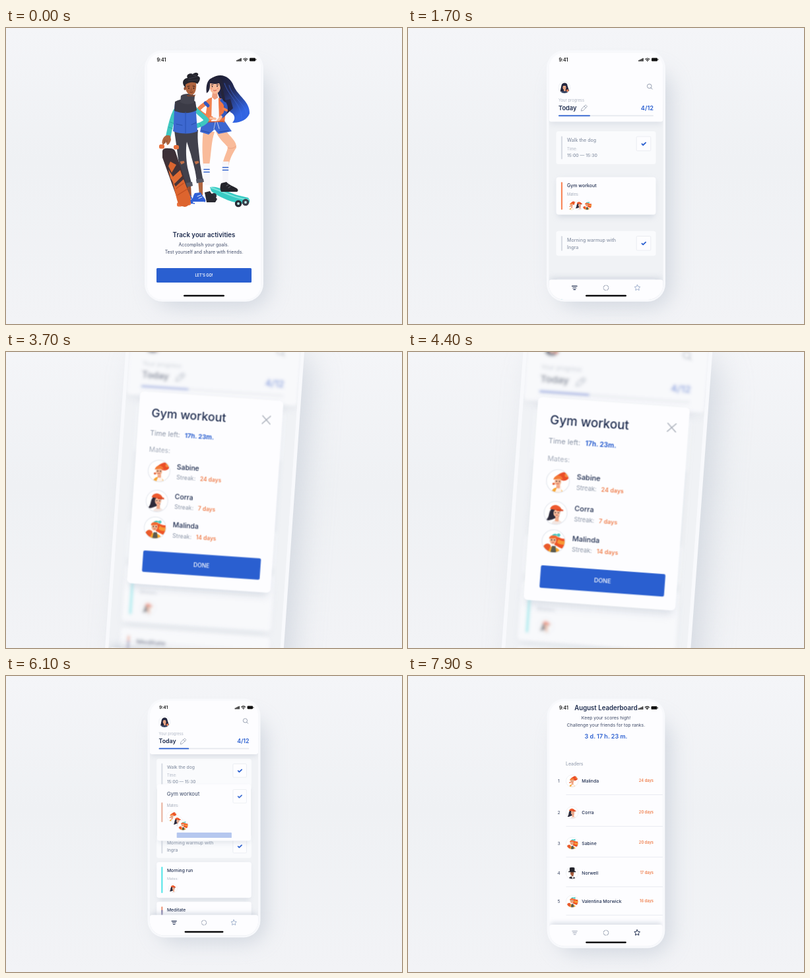
These frames come from a looping animation (600 px wide and 450 px high, 8000 ms). An HTML page:

```html
<!DOCTYPE html>
<html lang="en">
<head>
<meta charset="utf-8">
<title>Activity tracker</title>
<style>
html, body { margin: 0; width: 100%; height: 100%; overflow: hidden; background: #f0f2f6; }
svg { display: block; width: 100vw; height: 100vh; }
text { font-family: Inter, "Open Sans", sans-serif; }
</style>
</head>
<body>
<svg id="stage" viewBox="0 0 600 450"></svg>
<script>
const NAVY = '#1f2d4f', BLUE = '#2a5fd0', ORANGE = '#f0804f', GRAY = '#8b95a7', PALE = '#b1b8c5', LINE = '#e3e7ee';
const LOOP = 8000;

// Text is placed by its left, middle or right edge and its optical centre line.
const text = (x, y, str, size, fill = NAVY, weight = 400, anchor = 'start') =>
  `<text x="${x}" y="${(y + size * 0.36).toFixed(2)}" font-size="${size}" fill="${fill}" font-weight="${weight}" text-anchor="${anchor}">${str}</text>`;
const rect = (x, y, w, h, r, fill, extra = '') =>
  `<rect x="${x}" y="${y}" width="${w}" height="${h}" rx="${r}" fill="${fill}" ${extra}/>`;
const path = (d, fill, extra = '') => `<path d="${d}" fill="${fill}" ${extra}/>`;
const stroke = (d, color, width, extra = '') =>
  `<path d="${d}" fill="none" stroke="${color}" stroke-width="${width}" stroke-linecap="round" stroke-linejoin="round" ${extra}/>`;
const circle = (x, y, r, fill, extra = '') => `<circle cx="${x}" cy="${y}" r="${r}" fill="${fill}" ${extra}/>`;
const ellipse = (x, y, rx, ry, fill) => `<ellipse cx="${x}" cy="${y}" rx="${rx}" ry="${ry}" fill="${fill}"/>`;
const group = (id, body, extra = '') => `<g id="${id}" ${extra}>${body}</g>`;
const at = (x, y, body, s = 1) => `<g transform="translate(${x} ${y}) scale(${s})">${body}</g>`;

const face = (skin, x = 0, y = 0) => ellipse(x, y, 2.8, 3.4, skin) +
  circle(x - 1.2, y - .3, .5, '#2b2530') + circle(x + 1.3, y - .3, .5, '#2b2530') +
  stroke(`M${x - .8} ${y + 1.7}q.9 .7 1.8 0`, '#c2433a', .5);

// Portraits drawn in a disc of radius 10.
const portraits = {
  pom: path('M-5 10C-4 4 4 4 5 10Z', '#f6a532') + path('M-2 10l2-6 3 0 1 6Z', '#fff4ec') +
    path('M-1 2h3v4h-3Z', '#f3a583') + path('M-2-4C2-8 7-10 9-6C10-2 6 0 3-1Z', '#ea4d27') + face('#f8b893', 0, .5) +
    path('M-4-1C-3-6 3-6 4-2L0-2Z', '#f47a35') + circle(7, -5.5, 1.6, '#f58a3c') + circle(-3.5, 2.5, 1, '#e4582b'),
  cap: path('M-3-4C-7 0-4 3-8 7C-4 7-1 5 3 3L4-3Z', '#2c2a3a') + path('M-3 10C-2 5 5 4 7 10Z', '#f2e6e2') +
    path('M0 3h3v4h-3Z', '#f1a988') + face('#f9bf9f', 1) + path('M-5-3C-4-8 3-8 5-3L1-2.4Z', '#ee5a2e') + path('M0-3L6-3.4 6.5-2 1-1.8Z', '#d9441f'),
  wind: path('M0-4C4-5 6-2 10-3L10 6C6 6 4 4 1 3Z', '#ef5326') + path('M4-2q3 2 6 1v3q-4 1-7-1Z', '#f79a35') +
    path('M-9 10C-7 3 5 3 7 10Z', '#f4a62c') + path('M-9 7C-8 2-4 1-2 4L-4 9Z', '#ea5a2a') +
    path('M-2 10l1-6 3 0 1 6Z', '#5a5a4f') + face('#f7b48d', -.5, -.8) +
    path('M-4-2C-4-6 3-6 3.5-3Z', '#f1672f') + path('M-2-5q3-3 6 0Z', '#48c5bd') + circle(4, -5.5, 1.4, '#48c5bd'),
  user: path('M-5-3C-4-9 5-9 5-3L8 6-7 7Z', '#22243b') + path('M-7 10C-5 4 5 4 8 10Z', '#33405f') +
    path('M-1 2h3v4h-3Z', '#f1a988') + face('#f6b591') + path('M-4-2C-2-7 4-6 4-2L0-3Z', '#2b2d47') + circle(5, 5, 2, '#e57a52'),
  hat: path('M-6 10C-5 4 4 4 6 10Z', '#33333d') + path('M-1 2h3v4h-3Z', '#8d4b2f') + face('#a85f3c', 0, .3) +
    rect(-4, -9, 8, 7, 1, '#24242c') + rect(-6, -3, 12, 1.5, .7, '#24242c') + path('M-1 5l2 5 2-5Z', '#f0efee')
};
const avatar = kind => circle(0, 0, 10, '#fff') + `<g clip-path="url(#disc)">${portraits[kind]}</g>` +
  circle(0, 0, 9.8, 'none', `stroke="${LINE}" stroke-width=".6"`);

const shadow = (x, y, w, h, r, opacity = .45) => rect(x, y, w, h, r, '#c2c9d5', `opacity="${opacity}" filter="url(#soft)"`);
const checkbox = rect(-10.8, -10.8, 21.6, 21.6, 1.5, '#fdfdff', 'stroke="#dfe3ea" stroke-width=".6"') +
  stroke('M-2.6 .3l1.8 1.8 3.9-3.7', BLUE, 1.8);

function boy() {
  const pants = '#41414c', brown = '#b0653f', teal = '#3fc7c0';
  const rip = (x, y) => path(`M${x - 3.5} ${y - 2}l6-1 1 3-5 2.5Z`, '#c07048');
  const wheel = (x, y) => rect(x - 4, y - 3, 8, 6.5, 2.5, '#e8703c');
  const shoe = (x, y) => path(`M${x} ${y}l9-1c2 5 5 7 7 11q1 3-1 4H${x - 3}q-1-8 3-14Z`, '#2f5fd6') +
    stroke(`M${x - 2} ${y + 14}h16`, '#eef1fb', 1.8) + stroke(`M${x + 4} ${y + 5}l5-2m-3 5l5-2`, '#fff', .9);
  return path('M273 238h7l1 19h-6Z', '#994f31') + path('M291 232h7l0 22h-5Z', brown) +
    shoe(270, 254) + shoe(286, 251) +
    path('M255 156L291 155C289 170 293 190 294 206L299 234L289 235C288 218 283 205 280 192L274 173C272 184 273 200 275 212L282 240L272 242C268 226 263 212 261 200C259 184 257 170 255 156Z', pants) +
    rip(267, 205) + rip(289, 205) + path('M271 236l11-2 1 6-11 2Z', '#555561') + path('M288 230l11-1 1 5-11 2Z', '#555561') +
    stroke('M257 126C252 136 249 148 246 164', teal, 7.5) + stroke('M249 143l5 2m-7 6l5 2', '#2ba9a6', 1) +
    stroke('M286 123C293 130 300 135 304 140C300 146 292 148 284 150', teal, 7) + stroke('M293 145l2 4', '#2ba9a6', 1) +
    path('M256 114C266 108 282 108 287 114L290 157C281 162 263 161 253 157C255 143 254 127 256 114Z', '#3d68d0') +
    path('M256 112C267 106 281 106 287 112L289 125C278 131 266 130 255 126Z', '#3b3b46') +
    stroke('M272 128L272 160', '#2850b2', 1) + stroke('M258 146l9 2m14-1l7-3', '#274fa9', 1) +
    path('M265 103C269 99 282 99 286 103L285 113C280 117 270 116 264 113Z', '#44444f') +
    path('M271 83C273 78 286 77 288 83C289 92 287 101 281 102C274 101 271 94 271 83Z', brown) +
    path('M274 101c4 2 9 2 13 0l-1 3h-11Z', '#7c432c') + ellipse(271, 92, 1.6, 2.5, '#8e4e32') +
    path('M269 87C266 80 271 76 275 76C272 71 279 68 283 70C288 66 294 69 290 73C297 74 293 82 290 85C285 81 277 82 272 86L272 91Z', '#25252d') +
    stroke('M277 77l12-3m-13 6l15-1m-10-9l7 3', '#3c3c47', 1) +
    stroke('M275 89l3-.8m5 0l3 .6', '#3b211a', 1) + circle(277, 91.5, .9, '#2a1814') + circle(284.5, 91.5, .9, '#2a1814') +
    stroke('M280.5 92l.6 3-1.4 0', '#7d432b', .7) + stroke('M279 97.5q2.4 1 4-.3', '#67301f', .9) +
    wheel(236, 180) + wheel(258, 181) + wheel(263, 268) + wheel(276, 266) +
    path('M237 187Q238 182 247 183Q255 182 257 189L279 255Q281 270 271 272Q262 271 260 261L237 197Z', 'url(#deck)') +
    path('M249 203l9 5-7 12-5-10Z', '#da652f') + path('M246 215l7 11 11-10 3 9-12 12-6-9Z', '#e16c33') +
    path('M252 232l5 9 12-11 11 28q0 12-9 13-10 0-12-10Z', '#dd642e') + stroke('M258 244l11-8m-9 18l16-10', '#c24f20', 1.4) +
    path('M238 168q4-7 11-4l1 6q-2 7-6 8l-1-5-5 5q-3-4 0-10Z', brown) + stroke('M241 170l-1 5m4-4l-1 4', '#78402a', .8);
}

function girl() {
  const skin = '#f9bb9a', shade = '#ee9f7f', coat = '#f0814f';
  const shoe = (x, y) => path(`M${x} ${y}l8-2c4 5 10 6 16 10q3 3 0 5h-24q-3-6 0-13Z`, '#24242b') +
    stroke(`M${x + 8} ${y + 4}l3-2m0 5l3-2`, '#787985', .8);
  const sock = (x, y, lean) => path(`M${x} ${y}h10l${lean - 1} 33h-8Z`, '#f7f6fa') +
    stroke(`M${x + 1} ${y + 9}h8m-8 4h8`, '#3767ce', 1.7);
  return path('M312 76C326 67 340 74 345 88C351 103 370 112 369 130C366 139 354 145 343 144C349 137 346 131 340 128C336 120 330 114 324 108Z', 'url(#hair)') +
    stroke('M331 84C337 104 358 117 357 138M338 87C343 107 366 118 364 132', '#4170e6', 1, 'opacity=".6"') +
    path('M299 156L316 158C311 172 311 190 308 209L299 209C297 192 297 171 299 156Z', skin) +
    path('M318 157L333 156C339 165 350 172 349 182C343 191 339 199 337 210L328 210C329 197 336 187 336 181C330 174 322 168 318 157Z', skin) +
    stroke('M336 182C340 184 345 183 348 180', shade, 1) + sock(299, 206, 1) + sock(327.5, 203, 0) +
    path('M309 242C319 239 335 249 350 254L367 258Q372 264 366 268C346 267 325 259 311 248Z', '#39cbc4') +
    stroke('M311 243C325 246 343 259 367 261', '#7ce4dc', 2) +
    circle(315, 255, 4, '#30313c') + circle(352, 267, 5.2, '#282a35') + circle(363, 265, 5.2, '#3a3d49') +
    circle(352, 267, 1.9, '#b9eee9') + circle(363, 265, 1.9, '#b9eee9') +
    path('M301 250l8-2c2 5 8 8 11 12l-3 5h-13Z', '#2a2a32') + shoe(326, 236) +
    path('M297 142L331 141L342 157L322 161L316 154L307 162L294 158Z', '#3d67d1') + stroke('M316 143v11m-20 2l12 3m15-1l14-2', '#2348a5', 1) +
    path('M306 108Q316 102 327 108L331 143H301Z', coat) + path('M312 106h10l1 37h-12Z', '#faf8fb') +
    path('M322 107l5 0 6 18-2 19-7-3Z', '#ee7544') + path('M330 110l10-2 4 14-13 12Z', '#25274a') + stroke('M327 110C335 116 336 128 328 134', '#3158bf', 5) +
    stroke('M330 123l4 2', '#f0814f', 4) + stroke('M308 111C300 116 294 120 291 125C297 131 304 135 311 137', coat, 6) +
    stroke('M302 114l4 4', '#3158bf', 5) + stroke('M310 137l7 1', skin, 3.6) + stroke('M326 135l-5 6', skin, 3.6) +
    stroke('M301 143l29-1', '#c9532e', 1.4) + stroke('M317 143l-2 11m5-11l3 10', '#e8edfa', .8) +
    path('M313 97h7l1 9-5 3-4-4Z', shade) + path('M308 82C311 75 324 76 325 85C326 93 323 100 316 100C310 99 307 91 308 82Z', skin) +
    path('M304 99C302 83 308 74 318 75C326 74 331 83 329 94L333 113C324 110 327 93 323 84C316 86 311 84 309 84C309 90 309 96 304 99Z', '#24243a') +
    circle(312.5, 89, .9, '#271b26') + circle(320, 88.5, .9, '#271b26') + stroke('M311 86.6l3-.6m5 0l3 .4', '#35202a', .9) +
    stroke('M314.5 95q2 1.2 4.2-.4', '#d0443e', 1) + circle(311.5, 92, 1.2, '#f49b82') + circle(321, 92, 1.2, '#f49b82');
}

function cards() {
  const row = (y, h, color, active) => (active ? shadow(227, y + 4, 146, h, 4) : '') +
    rect(224.5, y, 151, h, 3.5, active ? '#fdfdff' : '#fafbfd') + rect(231.9, y + 7.5, 2.2, h - 15, 1, color);
  const title = (y, str, active) => text(241, y, str, 7.1, active ? NAVY : GRAY, 500);
  const mates = (y, kind) => text(241, y + 26, 'Mates:', 5.7, PALE) + at(250.5, y + 42, avatar(kind), .72);
  return group('card0', row(130, 50, '#d9dde4') + title(143.5, 'Walk the dog') + text(241, 156.8, 'Time:', 5.8, PALE) +
      text(241, 166.5, '15:00 — 15:30', 6.8, GRAY, 500) + at(357, 149, checkbox)) +
    group('card2', row(251.5, 37.5, '#d9dde4') + title(264.8, 'Morning warmup with') + title(276, 'Ingra') + at(357, 270, checkbox)) +
    group('card3', row(295.5, 57, '#54e4e8', true) + title(308.3, 'Morning run', true) + mates(295.5, 'cap')) +
    group('card4', row(359, 57, '#ed9275', true) + rect(231.9, 372, 2.2, 36, 1, '#7d86b8') + title(372, 'Meditate', true) + mates(359, 'hat'));
}

const header = rect(213.5, -345, 173, 468, 4, '#fdfdff') + group('headBody',
  at(237, 71, avatar('user'), .92) +
  circle(365.7, 69, 3.3, 'none', 'stroke="#8b95a7" stroke-width=".9"') + stroke('M368.2 71.6l2 2', GRAY, 1) +
  text(228, 90.3, 'Your progress', 5.9, PALE) + text(228, 102, 'Today', 9.3, NAVY, 600) +
  stroke('M262.5 106.3l.7-3 5.2-5.2q.8-.7 1.6 0l.9.9q.7.8 0 1.6l-5.2 5.1Zm4.4-6.8l2.6 2.6', GRAY, .8) +
  text(372, 102, '4/12', 9.2, BLUE, 600, 'end') +
  rect(228, 113, 144, 1.8, .9, '#e5e8ee') + rect(228, 113, 48, 1.8, .9, BLUE));

function gymCard() {
  const mate = (name, days, y) => text(269.7, y - 5, name, 6.9, NAVY, 500) +
    text(270, y + 5.5, 'Streak:', 5.8, GRAY) + text(293.8, y + 5.5, `${days} days`, 5.6, ORANGE, 600);
  return `<rect id="gymShade" rx="4" fill="#bcc4d2" filter="url(#soft)"/><rect id="gymBox" rx="4" fill="#fdfdff"/>` +
    `<rect id="gymBar" x="231.9" width="2.2" rx="1"/>` +
    group('gymTitle', text(0, 0, 'Gym workout', 7, 'currentColor', 500)) +
    group('gymMates', text(0, 0, 'Mates:', 5.7, '#a4acba')) +
    group('info', text(240.3, 160.3, 'Time left:', 6.9, GRAY) + text(275.5, 160.5, '17h. 23m.', 6.3, BLUE, 700) +
      mate('Sabine', 24, 198) + mate('Corra', 7, 228) + mate('Malinda', 14, 257)) +
    ['pom', 'cap', 'wind'].map((kind, i) => group('mate' + i, avatar(kind))).join('') +
    group('done', rect(-59.5, -10.8, 119, 21.6, 1.5, BLUE) + group('doneText', text(0, 0, 'DONE', 5.7, '#fff', 500, 'middle'))) +
    group('close', stroke('M-4-4L4 4M4-4L-4 4', '#a7adb8', .9)) + group('gymCheck', checkbox);
}

const leaders = [['Malinda', 24, 'pom', 160], ['Corra', 20, 'cap', 208.5], ['Sabine', 20, 'wind', 255.5],
  ['Norwell', 17, 'hat', 301], ['Valentina Morwick', 16, 'wind', 344.5]];
const leaderboard = rect(213, 36, 174, 378, 0, '#fdfdff') + group('boardHead',
    text(300, 48.5, 'August Leaderboard', 9.7, NAVY, 600, 'middle') +
    text(300, 63.5, 'Keep your scores high!', 6.9, '#3f4a66', 400, 'middle') +
    text(300, 74.5, 'Challenge your friends for top ranks.', 6.9, '#3f4a66', 400, 'middle') +
    text(300, 91.8, '3 d. 17 h. 23 m.', 9.1, BLUE, 600, 'middle') + text(238.6, 134, 'Leaders', 7, GRAY)) +
  leaders.map(([name, days, kind, y], i) => group('leader' + i,
    text(228, y, i + 1, 6.9, '#3f4a66', 400, 'middle') + at(248.3, y, avatar(kind), .95) + text(263, y, name, 6.9, NAVY, 500) +
    text(372.5, y - 1, `${days} days`, 5.8, ORANGE, 600, 'end') + rect(239, y + 20.5, 148, 1, 0, '#e9ebf1'))).join('');

const star = Array.from({ length: 10 }, (_, i) => {
  const a = i * Math.PI / 5, r = i % 2 ? 2.3 : 4.6;
  return `${(Math.sin(a) * r).toFixed(2)} ${(-Math.cos(a) * r).toFixed(2)}`;
}).join('L');
const nav = shadow(215, 377, 170, 40, 4, .6) + rect(213.5, 380, 173, 50, 4, '#fdfdff') +
  group('navList', stroke('M248.5 389.8h7.6m-6.4 2.6h5.2m-4 2.6h2.8', 'currentColor', 1.2)) +
  circle(300, 392.4, 3.9, 'none', `stroke="${GRAY}" stroke-width=".9" stroke-dasharray="5.2 .9"`) +
  group('navStar', stroke(`M${star}Z`, 'currentColor', 1), 'transform="translate(347.5 392.4)"');

const statusBar = text(228.4, 48, '9:41', 7, '#111', 600) +
  [0, 1, 2, 3].map(i => rect(349.2 + i * 2, 48.7 - i, 1.5, 2 + i, .4, '#111')).join('') +
  stroke('M359.7 47.3q3.1-2.7 6.2 0m-4.7 1.5q1.6-1.3 3.2 0', '#111', 1.1) + circle(362.8, 50.2, .8, '#111') +
  rect(369, 45.6, 9, 4.8, 1.2, '#111') + rect(378.5, 47, .9, 2, .4, '#111') + rect(269, 405.8, 62, 2.5, 1.2, '#0a0a0c');

document.getElementById('stage').innerHTML = `
<defs>
  <linearGradient id="back" x2="0" y2="1"><stop stop-color="#f4f5f8"/><stop offset=".45" stop-color="#eff1f4"/><stop offset="1" stop-color="#f2f3f6"/></linearGradient>
  <linearGradient id="hair" x1=".1" y1="0" x2=".8" y2="1"><stop stop-color="#1d1d2e"/><stop offset=".4" stop-color="#232a57"/><stop offset=".85" stop-color="#3164e2"/></linearGradient>
  <linearGradient id="deck" x2="0" y2="1"><stop stop-color="#3a3038"/><stop offset=".65" stop-color="#493437"/><stop offset="1" stop-color="#d9622c"/></linearGradient>
  <clipPath id="disc"><circle r="9.6"/></clipPath>
  <clipPath id="screen"><rect x="213.5" y="37.5" width="173" height="375.5" rx="23"/></clipPath>
  <filter id="soft" x="-30%" y="-60%" width="160%" height="220%"><feGaussianBlur stdDeviation="4"/></filter>
  <filter id="wide" x="-60%" y="-30%" width="220%" height="160%"><feGaussianBlur stdDeviation="16"/></filter>
  <filter id="blur" x="-10%" y="-10%" width="120%" height="120%"><feGaussianBlur id="blurSize" stdDeviation="1"/></filter>
</defs>
${rect(0, 0, 600, 450, 0, 'url(#back)')}
${group('phone', rect(226, 66, 172, 358, 30, '#bcc4d0', 'opacity=".6" filter="url(#wide)"') + rect(210, 34, 180, 382, 27, '#f8f9fc') +
  `<g clip-path="url(#screen)">${rect(213, 37, 174, 377, 0, '#f0f2f5') +
    group('list', cards() + group('head', shadow(215, 90, 170, 36, 4) + header)) + group('gym', gymCard()) +
    group('intro', group('people', girl() + boy()) + group('pitch',
      text(300, 315, 'Track your activities', 9.7, NAVY, 600, 'middle') +
      text(299.5, 330, 'Accomplish your goals.', 6.9, '#3f4a66', 400, 'middle') +
      text(300, 341, 'Test yourself and share with friends.', 6.9, '#3f4a66', 400, 'middle')) +
      group('start', rect(228, 365, 144, 22, 1.5, BLUE) + text(300, 376, 'LET’S GO!', 5.6, '#fff', 600, 'middle'))) +
    group('board', leaderboard) + group('nav', nav) + statusBar}</g>`)}
<circle id="touch" fill="#59678c" fill-opacity=".23" stroke="#4f5c86"/>`;

const nodes = {};
document.querySelectorAll('[id]').forEach(n => nodes[n.id] = n);
function set(id, attrs) {
  for (const key in attrs) nodes[id].setAttribute(key, attrs[key]);
}
const move = (id, x, y, sx = 1, sy = sx) => set(id, { transform: `translate(${x} ${y}) scale(${sx} ${sy})` });
const show = (id, opacity) => set(id, { opacity, display: opacity > .001 ? 'inline' : 'none' });

const lerp = (a, b, p) => a + (b - a) * p;
const ramp = (t, from, to) => Math.min(1, Math.max(0, (t - from) / (to - from)));
const smooth = p => p * p * (3 - 2 * p);
const cubic = p => p < .5 ? 4 * p ** 3 : 1 - 4 * (1 - p) ** 3;
const settle = (t, mark, size) => size * Math.exp(-(t - mark) / 280);
const mix = (a, b, p) => `rgb(${a.map((v, i) => Math.round(lerp(v, b[i], p)))})`;

// time, scale, angle, centre x, centre y
const camera = [
  [0, 1, 0, 300, 225], [1850, 1, 0, 300, 225], [2800, 2.05, 4.4, 299.5, 224.5], [3050, 2.07, 4.4, 299.5, 224.5],
  [3650, 1.5, 3.95, 301, 225.5], [4600, 1.6, 4.2, 300, 246.5], [5450, 1.6, 4.2, 300, 246.5],
  [6050, .95, 0, 300, 216], [6150, .95, 0, 300, 216], [6700, .985, 0, 300, 222.5], [8000, .993, 0, 300, 224.2]];

function moveCamera(t) {
  const i = camera.findIndex(key => key[0] > t), a = camera[i - 1], b = camera[i];
  const p = smooth(ramp(t, a[0], b[0]));
  const [s, angle, x, y] = [1, 2, 3, 4].map(k => lerp(a[k], b[k], p));
  set('phone', { transform: `translate(${x} ${y}) rotate(${angle}) scale(${s}) translate(-300 -225)` });
}

function drawGym(t, open, finished) {
  const y = lerp(187.5, 119.3, open), h = lerp(57, 194.5, open), x = lerp(224.5, 227.5, open), w = lerp(151, 145, open);
  set('gymBox', { x, y, width: w, height: h });
  set('gymShade', { x: x + 2, y: y + 4, width: w - 4, height: h, opacity: .5 * (1 - .7 * finished) });
  const barHeight = 42 * (1 - open);
  set('gymBar', { y: lerp(216, 215, open) - barHeight / 2, height: barHeight, fill: mix([248, 137, 92], [217, 221, 228], finished) });
  nodes.gymTitle.style.color = mix([31, 45, 79], [139, 149, 167], finished);
  move('gymTitle', lerp(241, 240.3, open), lerp(200.5, 140.3, open), lerp(1, 1.69, open));
  move('gymMates', lerp(241, 240.5, open), lerp(213.5, 177.3, open), lerp(1, 1.18, open));
  [198.3, 228.8, 256].forEach((my, i) => move('mate' + i, lerp(247.7 + 11.7 * i, 252, open), lerp(230, my, open), lerp(.74, 1.12, open)));
  show('info', ramp(open, .7, 1));
  show('done', Math.min(1, open * 1.4));
  move('done', lerp(300, 301.3, open), lerp(240, 290.5, open), lerp(.65, 1, open), lerp(.2, 1, open));
  show('doneText', ramp(open, .5, .9));
  const cy = lerp(206.5, 139.3, open);
  show('close', ramp(open, .55, 1));
  move('close', 356.5, cy);
  show('gymCheck', t > 5500 ? ramp(open, .6, .2) : 0);
  move('gymCheck', 357, cy);
}

function drawTouch(t) {
  const [mark, x, y, r, line] = t < 4000 ? [2800, 301, 210, 21.2, 1.8] : [5400, 292, 351, 8, 1.4];
  show('touch', ramp(t, mark - 250, mark - 80) * (1 - ramp(t, mark + 60, mark + 260)));
  set('touch', { cx: x, cy: y, r: r * (1 + .4 * (1 - smooth(ramp(t, mark - 250, mark)))), 'stroke-width': line });
}

function render(t) {
  moveCamera(t);

  [['people', 200, 800], ['pitch', 300, 850], ['start', 380, 920]].forEach(([id, from, to]) => {
    const p = smooth(ramp(t, from, to));
    show(id, 1 - p);
    move(id, 0, -45 * p);
  });

  const rise = size => settle(Math.max(t, 900), 1700, size);
  move('head', 0, rise(19.5));
  show('headBody', ramp(t, 900, 1250));
  [['card0', 27], ['gym', 39.5], ['card2', 57.5], ['card3', 86], ['card4', 115]].forEach(([id, size]) => move(id, 0, rise(size)));
  move('nav', 0, rise(2.6));
  show('nav', ramp(t, 900, 1100));

  const open = t < 5000 ? cubic(ramp(t, 2880, 3480)) : 1 - cubic(ramp(t, 5610, 6420));
  const haze = ramp(open, .35, 1);
  set('list', { filter: haze > .01 ? 'url(#blur)' : 'none', opacity: 1 - .4 * haze });
  set('blurSize', { stdDeviation: .01 + 1.3 * haze });
  drawGym(t, open, smooth(ramp(t, 5850, 6350)));

  const enter = size => settle(Math.max(t, 6850), 7900, size) - size;
  show('board', smooth(ramp(t, 6800, 7100)));
  move('boardHead', 0, enter(6));
  leaders.forEach((_, i) => move('leader' + i, 0, enter(8 + 4 * i)));
  const starred = smooth(ramp(t, 6700, 6900));
  nodes.navList.style.color = mix([31, 45, 79], [177, 184, 197], starred);
  nodes.navStar.style.color = mix([160, 176, 205], [31, 45, 79], starred);

  drawTouch(t);
}

function tick(now) {
  render(now % LOOP);
  requestAnimationFrame(tick);
}
render(0);
requestAnimationFrame(tick);
</script>
</body>
</html>
```
